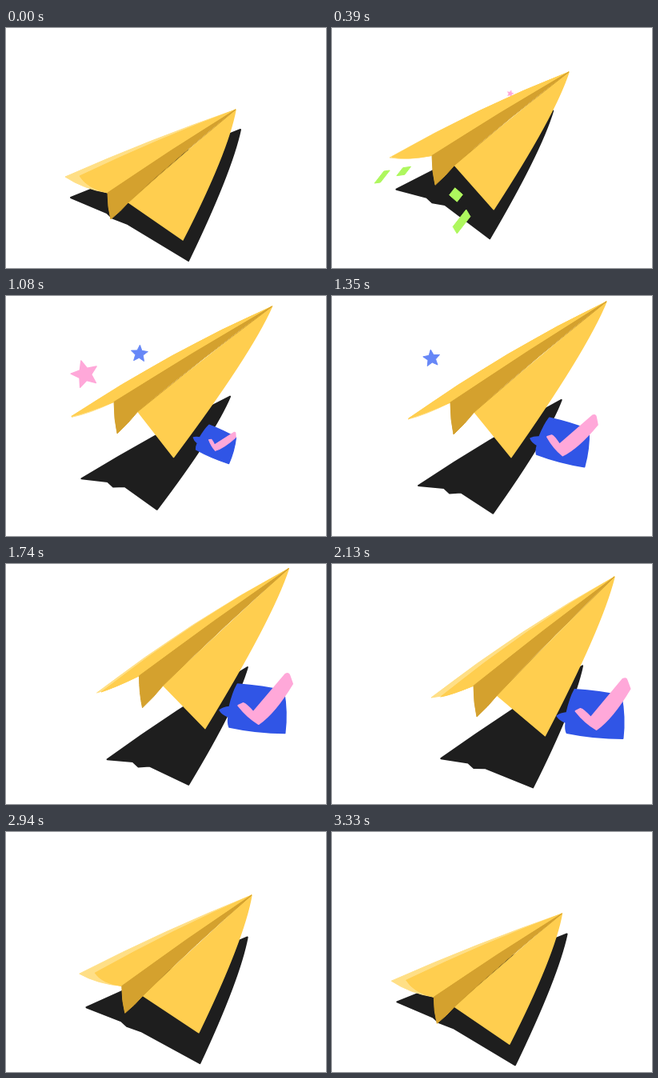
Write an HTML page with a canvas that moves like this. It is 400x300 px and loops after 3360 ms.

```html
<!DOCTYPE html>
<html lang="en">
<head>
<meta charset="utf-8">
<title>Paper plane</title>
<style>
html, body { margin: 0; width: 100%; height: 100%; overflow: hidden; background: #fff; }
canvas { display: block; width: 400px; height: 300px; }
</style>
</head>
<body>
<canvas id="stage" width="400" height="300"></canvas>
<script>
const LOOP = 3360, STEP = 30;
const ctx = document.getElementById('stage').getContext('2d');
const BLACK = '#1e1e1e', YELLOW = '#ffce4f', GOLD = '#d4a12e', PALE = '#ffdf86',
      BLUE = '#3055e6', SKY = '#6687f7', PINK = '#ffa8d9', LIME = '#aef75e';

const clamp = u => Math.max(0, Math.min(1, u));
const ramp = (t, from, to) => clamp((t - from) / (to - from));
const smooth = u => u * u * (3 - 2 * u);
const rad = deg => deg * Math.PI / 180;
const add = (p, x, y) => [p[0] + x, p[1] + y];

// Smooth curve through rows [time, ...values]; holds the ends.
function sample(rows, t) {
  let i = 0;
  while (i < rows.length - 2 && t >= rows[i + 1][0]) i++;
  const a = rows[i], b = rows[i + 1], h = b[0] - a[0], u = clamp((t - a[0]) / h);
  const slope = (k, j) => {
    const p = rows[k - 1], q = rows[k], r = rows[k + 1];
    if (!p || !r) return 0;
    const h0 = q[0] - p[0], h1 = r[0] - q[0];
    return ((q[j] - p[j]) / h0 * h1 + (r[j] - q[j]) / h1 * h0) / (h0 + h1);
  };
  const w = smooth(u);
  return a.slice(1).map((v, n) => v * (1 - w) + b[n + 1] * w +
    h * (u * (1 - u) ** 2 * slope(i, n + 1) - u * u * (1 - u) * slope(i + 1, n + 1)));
}

const cycle = rows => [-LOOP, 0, LOOP].flatMap(d => rows.map(([t, ...v]) => [t + d, ...v]));

// time, tip x y, tail x y, then 0..1: pitch, wing flap, shadow gap
const flight = cycle([
  [0, 287, 102, 74, 186, 0, 0, 0],
  [390, 296, 55, 72, 162, .55, .83, .24],
  [840, 321, 23, 73, 151.5, .86, 1, .73],
  [1350, 343, 7, 95, 154, 1, .96, 1],
  [2130, 353, 16, 124, 167, .85, .35, .88],
  [2580, 333, 45, 114, 166, .38, .09, .64],
  [3270, 288.5, 101, 75, 186, 0, -.06, .02]
]);

// time, x, y, scale, degrees
const bubble = [
  [750, 212, 195, 0, 60],
  [840, 229.5, 191, .23, 42],
  [1350, 291, 183, .88, 9],
  [2130, 330.5, 188, 1, 0],
  [2610, 345.5, 215, 1.18, 1]
];

// x, y, half length, half width, slant, how far it folds
const confetti = [
  [62.7, 186, 9.5, 3.7, -8, .35],
  [89.7, 179, 6.3, 5, -8, .75],
  [155, 208.5, 5.7, 6.4, 41, .85],
  [162, 242, 13.5, 5, 59, .4]
];

const stars = [
  { color: PINK, start: 370, life: 800, y: 82, size: 17.5 },
  { color: SKY, start: 780, life: 900, y: 70, size: 11 }
];

function paint(color, path, line = 1) {
  ctx.fillStyle = ctx.strokeStyle = color;
  ctx.lineWidth = line;
  ctx.lineJoin = 'round';
  ctx.fill(path);
  ctx.stroke(path);
}

// Closed outline; four-number entries are quadratic curves.
function outline(...steps) {
  const p = new Path2D();
  steps.forEach((s, i) => {
    if (!i) p.moveTo(...s);
    else if (s.length === 4) p.quadraticCurveTo(...s);
    else p.lineTo(...s);
  });
  p.closePath();
  return p;
}

// Curve from a to b, its handle at fraction f plus an offset.
const curve = (a, b, dx, dy, f = .5) =>
  [a[0] + (b[0] - a[0]) * f + dx, a[1] + (b[1] - a[1]) * f + dy, ...b];

function placed(x, y, scale, deg, draw) {
  ctx.save();
  ctx.translate(x, y);
  ctx.rotate(rad(deg));
  ctx.scale(scale, scale);
  draw();
  ctx.restore();
}

const bubblePath = new Path2D('M-27-31Q5-29 31-23Q36 3 33 30Q-3 30-37 23Q-39 18-38 10Q-46 7-49 2Q-45-1-37-2Q-33-20-27-31Z');
const checkPath = new Path2D('M-26-4L-20-7Q-16-6-7 4L33-44Q37-46 38-43L42-32Q20 5 0 19Q-14 11-26-4Z');
const starPath = outline(...Array.from({ length: 10 }, (_, i) => {
  const r = i % 2 ? .46 : 1, a = i * Math.PI / 5;
  return [r * Math.sin(a), -r * Math.cos(a)];
}));

function drawConfetti(t) {
  if (t < 120 || t > 1040) return;
  const out = 1 - (1 - ramp(t, 120, 390)) ** 2;
  const size = ramp(t, 120, 300) * (1 - ramp(t, 840, 1040));
  const late = ramp(t, 390, 840);
  for (const [x, y, length, width, slant, fold] of confetti) {
    const cx = 135 + (x - 135) * out - 9 * late, cy = 195 + (y - 195) * out - late;
    const l = length * size * (1 - late * (1 - fold)), w = width * size * (1 - .15 * late);
    const corner = (a, b) => [
      cx + a * l * Math.cos(rad(-52)) + b * w * Math.cos(rad(slant)),
      cy + a * l * Math.sin(rad(-52)) + b * w * Math.sin(rad(slant))
    ];
    paint(LIME, outline(corner(-1, -1), corner(1, -1), corner(1, 1), corner(-1, 1)));
  }
}

function drawBubble(t) {
  if (t < 750 || t > 2830) return;
  const [x, y, scale, deg] = sample(bubble, t);
  placed(x, y, scale * (1 - smooth(ramp(t, 2610, 2830))), deg, () => {
    paint(BLUE, bubblePath, 2);
    const c = smooth(ramp(t, 890, 1180));
    if (c) placed(0, 0, c, 0, () => paint(PINK, checkPath, 2));
  });
}

function drawStars(t) {
  for (const { color, start, life, y, size } of stars) {
    const u = (t - start) / life;
    if (u <= 0 || u >= 1) continue;
    const r = size * Math.min(1, 10 * u, 10 * (1 - u));
    placed(228 - 138 * u * (1.5 - .5 * u), y + 20 * u * u, r, 16 - 36 * u,
      () => paint(color, starPath, .08));
  }
}

function draw(t) {
  const [tx, ty, bx, by, pitch, flap, gap] = sample(flight, t);
  const tip = [tx, ty], tail = [bx, by];
  const wing = add(tail, 18 * (1 - flap), -1);
  const fold = add(tail, 53, 20 - 41 * pitch);
  const keel = add(fold, 4, 33 + 7 * pitch);
  const inner = add(fold, 26 + 4 * pitch, 12);
  const right = add(inner, 68 - 23 * flap, 47 + 10 * flap);
  const bow = -5 - 9 * pitch;

  const sTip = add(tip, 6 - 45 * gap - 18 * flap, 25 + 98 * gap);
  const sTail = add(tail, 7 + 6 * gap, 26 + 57 * gap);
  const sRight = add(right, 7 - 22 * gap - 8 * flap, 26 + 44 * gap);
  const notch = add(sTail, 45 - 13 * pitch, 19 - 16 * pitch);
  const dent = add(notch, 7, 6.5);
  const step = add(dent, 18 - 4 * pitch, 7 - 8 * pitch);

  ctx.clearRect(0, 0, 400, 300);
  paint(BLACK, outline(sTip, curve(sTip, sTail, -1, -5 * gap), notch, dent, step, sRight,
    curve(sRight, sTip, 8, 4, .7)), 2);
  drawConfetti(t);
  drawBubble(t);
  drawStars(t);

  paint(PALE, outline(tip, curve(tip, tail, 0, bow), curve(tail, fold, -4, 5)));
  paint(YELLOW, outline(tip, curve(tip, wing, 0, bow), curve(wing, fold, -8, 5)));
  paint(YELLOW, outline(tip, inner, right, curve(right, tip, 10, 4, .7)), 1.5);
  paint(GOLD, outline(tip, curve(tip, fold, -1, -2), curve(fold, keel, -2, 2),
    curve(keel, inner, 1, 1), curve(inner, tip, -1, -3)));
}

function frame() {
  const t = performance.now() % LOOP;
  draw(Math.floor(t / STEP) * STEP);
  requestAnimationFrame(frame);
}
frame();
</script>
</body>
</html>
```
